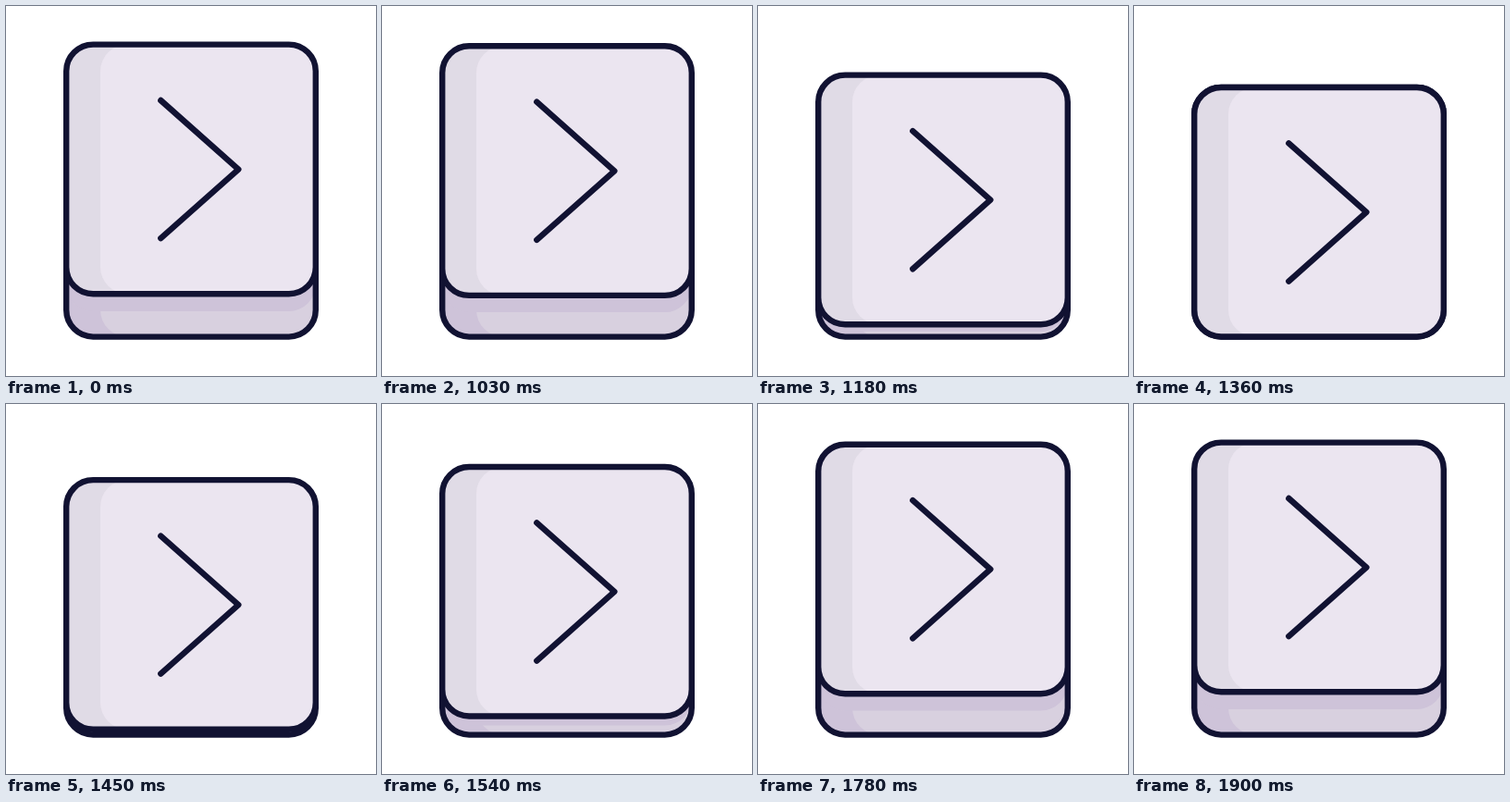
An HTML page with a canvas for the animation above (1.93 s loop, 400 by 400 pixels).

```html
<!DOCTYPE html>
<html lang="en">
<head>
<meta charset="utf-8">
<title>Key press</title>
<style>
html, body { margin: 0; width: 100%; height: 100%; overflow: hidden; background: #fff; }
canvas { display: block; width: 400px; height: 400px; }
</style>
</head>
<body>
<canvas id="stage"></canvas>
<script>
const LOOP = 1930, STEP = 30, PHASE = 10;
const PRESS = 1000, DOWN = 1350, UP = 1900;
const LEFT = 65.2, TOP = 41.6, SIZE = 269.6, RADIUS = 29;
const TRAVEL = 46.4, BAND = 102;
const INK = '#111232';

const canvas = document.getElementById('stage');
const ctx = canvas.getContext('2d');
const dpr = window.devicePixelRatio || 1;
canvas.width = canvas.height = 400 * dpr;

// Ease with horizontal handles at x = a and x = b
function ease(x, a, b) {
  if (x <= 0) return 0;
  if (x >= 1) return 1;
  let lo = 0, hi = 1, s = 0.5;
  for (let i = 0; i < 24; i++) {
    s = (lo + hi) / 2;
    const r = 1 - s;
    const at = 3 * s * r * r * a + 3 * s * s * r * b + s * s * s;
    if (at < x) lo = s; else hi = s;
  }
  return s * s * (3 - 2 * s);
}

function pressDepth(t) {
  if (t < DOWN) return TRAVEL * ease((t - PRESS) / (DOWN - PRESS), 0.26, 0.41);
  return TRAVEL * (1 - ease((t - DOWN) / (UP - DOWN), 0.32, 0.36));
}

function box(x, y, w, h) {
  ctx.beginPath();
  ctx.roundRect(x, y, w, h, RADIUS);
}

function fillBox(x, y, w, h, color) {
  box(x, y, w, h);
  ctx.fillStyle = color;
  ctx.fill();
}

function outline(y) {
  box(LEFT, y, SIZE, SIZE);
  ctx.stroke();
}

// Filled key body with a darker left band
function body(y, dark, light) {
  fillBox(LEFT, y, SIZE, SIZE, dark);
  fillBox(BAND, y, LEFT + SIZE - BAND, SIZE, light);
}

function draw(t) {
  const depth = pressDepth(t);
  const y = TOP + depth, base = TOP + TRAVEL;

  ctx.setTransform(dpr, 0, 0, dpr, 0, 0);
  ctx.fillStyle = '#fff';
  ctx.fillRect(0, 0, 400, 400);
  ctx.strokeStyle = INK;
  ctx.lineWidth = 6.4;
  ctx.lineCap = ctx.lineJoin = 'round';

  body(base, '#cec3d9', '#d8d0df');
  ctx.save();
  box(LEFT, base, SIZE, SIZE);
  ctx.clip();
  fillBox(LEFT, TOP + 18.8 + depth * 0.66, SIZE, SIZE, '#cec3d9');
  ctx.restore();
  outline(base);

  body(y, '#e0dbe6', '#ebe5f0');
  outline(y);

  ctx.beginPath();
  ctx.moveTo(167.3, 102 + depth);
  ctx.lineTo(251.3, 176.6 + depth);
  ctx.lineTo(167.3, 251.2 + depth);
  ctx.stroke();
}

const start = performance.now();
function frame() {
  const t = (performance.now() - start) % LOOP;
  draw(Math.max(0, Math.floor((t - PHASE) / STEP) * STEP + PHASE));
  requestAnimationFrame(frame);
}
frame();
</script>
</body>
</html>
```
